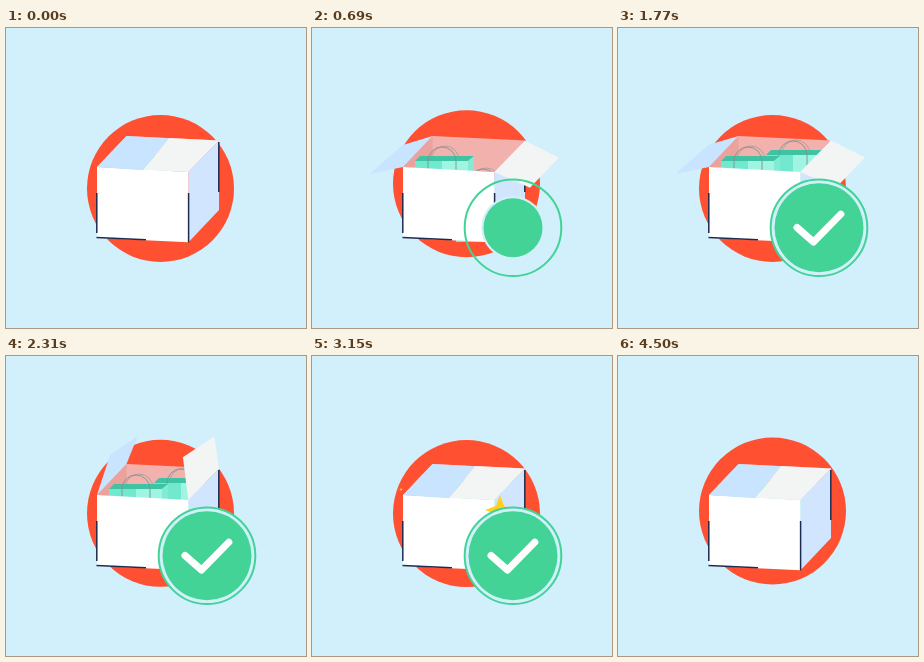
Animation of 300 by 300 pixels, one loop 4530 ms. Source, as an HTML page with a canvas:

```html
<!DOCTYPE html>
<html lang="en">
<head>
<meta charset="utf-8">
<title>Packed box</title>
<style>
html, body { margin: 0; width: 100%; height: 100%; overflow: hidden; background: #d1f0fc; }
canvas { display: block; width: 300px; height: 300px; }
</style>
</head>
<body>
<canvas id="stage" width="300" height="300"></canvas>
<script>
const LOOP = 4530, SKY = '#d1f0fc', GREEN = '#43d396', NAVY = '#1c2b50';
const ctx = document.getElementById('stage').getContext('2d');
const start = performance.now();

const mix = (a, b, k) => a + (b - a) * k;
const ramp = (t, a, b) => Math.min(1, Math.max(0, (t - a) / (b - a)));
const ease = (t, a, b) => { const k = ramp(t, a, b); return k * k * (3 - 2 * k); };

function poly(color, ...points) {
  ctx.beginPath();
  points.forEach(([x, y]) => ctx.lineTo(x, y));
  ctx.closePath();
  ctx.fillStyle = color;
  ctx.fill();
}

function disc(color, x, y, r) {
  ctx.beginPath();
  ctx.arc(x, y, Math.max(0, r), 0, 7);
  ctx.fillStyle = color;
  ctx.fill();
}

function stroke(color, width, ...points) {
  ctx.beginPath();
  points.forEach(([x, y]) => ctx.lineTo(x, y));
  ctx.strokeStyle = color;
  ctx.lineWidth = width;
  ctx.stroke();
}

function handle(x, y, drop, color) {
  ctx.beginPath();
  ctx.moveTo(x, y + drop);
  ctx.lineTo(x, y);
  ctx.arc(x + 14, y, 14, Math.PI, 0);
  ctx.lineTo(x + 28, y + drop);
  ctx.strokeStyle = color;
  ctx.lineWidth = 0.9;
  ctx.stroke();
}

function bag(x, y) {
  ctx.save();
  ctx.translate(x, y);
  handle(16, -1 + 5, 0, '#a8a09f');
  poly('#40c3a2', [5, 0], [59, 0], [53, 5], [0, 5]);
  poly('#72e8cf', [0, 5], [27, 5], [27, 64], [0, 64]);
  poly('#9ff5e2', [27, 5], [53, 5], [53, 64], [27, 64]);
  poly('#83ead4', [53, 5], [59, 0], [59, 60], [53, 64]);
  handle(13, 5, 13, '#7c9490');
  ctx.restore();
}

// Each corner swings on its hinge through [angle, length] poses: closed, upright, open.
function swing([x, y], side, poses, f) {
  const k = f < 0.41 ? f / 0.41 : 1 + (f - 0.41) / 0.59;
  const i = Math.min(1, Math.floor(k));
  const angle = mix(poses[i][0], poses[i + 1][0], k - i) * Math.PI / 180;
  const length = mix(poses[i][1], poses[i + 1][1], k - i);
  return [x + side * length * Math.cos(angle), y - length * Math.sin(angle)];
}

function lid(color, side, back, front, backPoses, frontPoses, f) {
  poly(color, back, swing(back, side, backPoses, f), swing(front, side, frontPoses, f), front);
}

function star(x, y, from, t) {
  const r = 15.5 * Math.sin(Math.PI * ramp(t, from, from + 970));
  if (r < 0.1) return;
  ctx.beginPath();
  for (let i = 0; i < 8; i++) {
    const a = i * Math.PI / 4, d = i % 2 ? r * 0.38 : r;
    ctx.lineTo(x + d * Math.sin(a), y - d * Math.cos(a));
  }
  ctx.fillStyle = '#ffd01c';
  ctx.fill();
}

function box(t) {
  const A = [120.5, 108], B = [213, 112.5], C = [182.3, 144], D = [91, 139];
  const open = ease(t, 60, 690) - ease(t, 1740, 2740);

  poly('#f3b1ae', A, B, C, D);
  poly('#eba29c', A, [121, 141], D);
  const rise = ease(t, 690, 1050), drop = ease(t, 1290, 1760);
  if (rise > 0) bag(mix(144, 148, drop), mix(mix(150, 76, rise), 122, drop));
  bag(103, 128);

  poly('#d1e6fe', C, B, [213, 182], [182.5, 214.3]);
  poly('#fff', D, C, [182.5, 214.3], [91, 210]);
  stroke(NAVY, 1.5, [90.8, 165], [90.8, 205]);
  stroke(NAVY, 1.5, [90.5, 209.5], [140, 211.7]);
  stroke(NAVY, 1.5, [182.6, 165], [182.6, 214.5]);
  stroke(NAVY, 1.5, [212.8, 114], [212.8, 164]);

  lid('#c8e4fe', 1, A, D,
    [[-3, 42.5], [71, 29.6], [197, 31]], [[-4, 46], [75, 42], [192, 34]], open);
  lid('#f3f4f4', -1, B, C,
    [[3, 50], [85, 32], [207, 38]], [[3, 45], [86, 43], [204, 39]], open);
}

function badge(t) {
  const x = 201, y = 199.7;
  const ring = ease(t, 150, 600) - ease(t, 3810, 4290);
  const fill = ease(t, 520, 800) - ease(t, 3900, 4230);
  const check = ease(t, 830, 1170) - ease(t, 3540, 3860);

  if (fill > 0) {
    disc(SKY, x, y, 47.8 * fill);
    disc(GREEN, x, y, 44.5 * fill);
  }
  if (ring > 0) {
    ctx.beginPath();
    ctx.arc(x, y, 48.3, -Math.PI / 2, -Math.PI / 2 + ring * 2 * Math.PI);
    ctx.strokeStyle = GREEN;
    ctx.lineWidth = 2;
    ctx.stroke();
  }
  if (check > 0) {
    ctx.save();
    ctx.lineCap = ctx.lineJoin = 'round';
    ctx.setLineDash([61 * check, 100]);
    stroke('#fff', 7, [179, 199.5], [195.5, 214], [223.5, 185.5]);
    ctx.restore();
  }
}

function draw(now) {
  const t = Math.max(0, now - start) % LOOP;
  ctx.fillStyle = SKY;
  ctx.fillRect(0, 0, 300, 300);
  disc('#ff5031', 154.5, 157.75 + 2.75 * Math.cos(5 * Math.PI * t / LOOP), 73.5);
  box(t);
  star(188, 154, 2750, t);
  star(89, 133.5, 3110, t);
  badge(t);
  requestAnimationFrame(draw);
}
draw(start);
</script>
</body>
</html>
```
